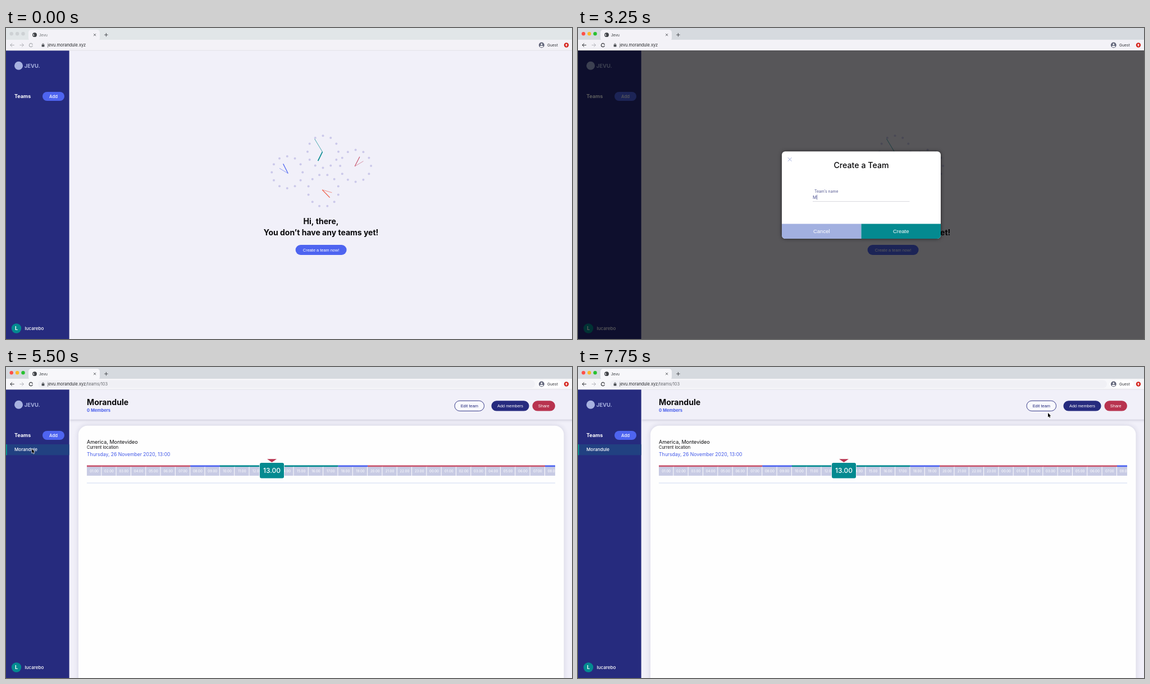
These frames come from a looping animation (1008 by 555 pixels, 8 s). An HTML page with a canvas:

```html
<!DOCTYPE html>
<html lang="en">
<head>
<meta charset="utf-8">
<title>Jevu</title>
<style>
  html, body { margin: 0; width: 100%; height: 100%; overflow: hidden; background: #f1f0f9; }
  canvas { display: block; width: 1008px; height: 555px; }
</style>
</head>
<body>
<canvas id="stage"></canvas>
<script>
const W = 1008, H = 555, TOP = 40, SIDE = 112.6;
const LOOP = 8000, STEP = 250;
const canvas = document.getElementById('stage');
const ratio = Math.max(1, window.devicePixelRatio || 1);
canvas.width = W * ratio;
canvas.height = H * ratio;
const c = canvas.getContext('2d');

const SANS = 'Inter, "Open Sans", sans-serif';
const ARIAL = '"Liberation Sans", Arial, sans-serif';
const NAVY = '#262b7e', BLUE = '#4e64f0', TEAL = '#048a90', PINK = '#c8566f', RED = '#b8334f';
const ORANGE = '#f0503a', PAGE = '#f1f0f9', PALE = '#a8b2e0', INK = '#08080a', GREY = '#4b4e53';
const APP = 'Jevu', TEAM = 'Morandule', USER = 'lucarebo';

function rect(x, y, w, h, fill) {
  c.fillStyle = fill;
  c.fillRect(x, y, w, h);
}

function round(x, y, w, h, r, fill) {
  c.beginPath();
  c.roundRect(x, y, w, h, r);
  c.fillStyle = fill;
  c.fill();
}

function dot(x, y, r, fill) {
  c.beginPath();
  c.arc(x, y, r, 0, Math.PI * 2);
  c.fillStyle = fill;
  c.fill();
}

function stroke(color, width) {
  c.strokeStyle = color;
  c.lineWidth = width;
  c.stroke();
}

function line(color, width, ...pts) {
  c.beginPath();
  for (let i = 0; i < pts.length; i += 2) c.lineTo(pts[i], pts[i + 1]);
  stroke(color, width);
}

function arc(x, y, r, from, to, color, width) {
  c.beginPath();
  c.arc(x, y, r, from, to);
  stroke(color, width);
}

function triangle(x, y, w, h, fill) {
  c.beginPath();
  c.moveTo(x - w / 2, y);
  c.lineTo(x + w / 2, y);
  c.lineTo(x, y + h);
  c.fillStyle = fill;
  c.fill();
}

function cross(x, y, r, color, width) {
  line(color, width, x - r, y - r, x + r, y + r);
  line(color, width, x - r, y + r, x + r, y - r);
}

// dir is -1 for left, 1 for right
function arrow(x, y, dir, color) {
  const tip = x + dir * 3.5;
  line(color, 1, x - dir * 3.5, y, tip, y);
  line(color, 1, tip - dir * 3.3, y - 3.3, tip, y, tip - dir * 3.3, y + 3.3);
}

function text(str, x, y, size, fill, { weight = 400, font = SANS, align = 'left' } = {}) {
  c.font = `${weight} ${size}px ${font}`;
  c.textAlign = align;
  c.fillStyle = fill;
  c.fillText(str, x, y);
}

function label(str, x, y, size, fill, style) {
  text(str, x, y + size * 0.36, size, fill, { font: ARIAL, align: 'center', ...style });
}

function pill(str, x, y, w, h, fill, style, size = 7.4) {
  round(x, y, w, h, h / 2, fill);
  label(str, x + w / 2, y + h / 2, size, '#fff', style);
}

function shadow(color, blur) {
  c.shadowColor = color;
  c.shadowBlur = blur * ratio;
}

function browser(focused, onTeam) {
  const mid = 30.5, tabMid = 12.2;
  const ink = focused ? '#303236' : '#a9abb0';
  const bar = onTeam ? '#f7f7fa' : '#f3f2f7';
  rect(0, 0, W, 22, focused ? '#d6dadf' : '#e1e6e8');
  round(40, 3, 127, 20, 5, bar);
  rect(0, 21, W, TOP - 21, bar);
  rect(0, TOP - 0.4, W, 0.8, '#dbdbe1');

  ['#fe5048', '#fdb827', '#28c131'].forEach((color, i) =>
    dot(9.7 + i * 10.4, 10.2, 3.2, focused ? color : '#cdd1d4'));

  dot(51, tabMid, 3.9, '#3f4246');
  arc(51, tabMid, 2, 2, 4, bar, 1.2);
  text(APP, 59, 14.6, 7, focused ? '#3c4043' : '#74777b', { font: ARIAL });
  cross(158.1, tabMid, 2, GREY, 0.9);
  line(GREY, 1, 175.2, tabMid, 181.6, tabMid);
  line(GREY, 1, 178.4, tabMid - 3.2, 178.4, tabMid + 3.2);

  arrow(11.2, mid, -1, ink);
  arrow(28, mid, 1, '#b3b4ba');
  arc(44.5, mid, 3.1, 0.3, 5.4, ink, 1.1);
  triangle(46.8, 28.4, 2.6, 2.2, ink);

  if (onTeam) {
    round(57, 23.5, 885, 14, 7, '#f0f0f5');
    round(947, 23.5, 42, 14, 7, '#fff');
  }
  round(63.6, 29.5, 4.8, 4, 0.6, GREY);
  arc(66, 29.3, 1.5, Math.PI, 0, GREY, 0.8);
  const host = 'jevu.morandule.xyz';
  text(host, 74, 33.2, 7.4, '#26282b');
  if (onTeam) text('/teams/103', 74 + c.measureText(host).width, 33.2, 7.4, '#63666b');

  dot(953.8, mid, 4.9, '#62667a');
  dot(953.8, 28.9, 1.5, '#fff');
  round(951, 31.7, 5.6, 2.6, 1.3, '#fff');
  text('Guest', 964, 33, 6.8, '#33353a');
  dot(998, mid, 4.2, '#d5261e');
  triangle(998, 30.7, 4.4, -2.7, '#fff');
  rect(997.3, mid, 1.4, 2.3, '#fff');
}

function sidebar(hasTeam) {
  rect(0, TOP, SIDE, H, NAVY);
  dot(22.5, 67.2, 7.5, PALE);
  text(APP.toUpperCase() + '.', 32.8, 70.7, 9.4, PALE, { weight: 700 });
  text('Teams', 15, 125.3, 9, '#fff', { weight: 700 });
  pill('Add', 65, 114, 39, 16, BLUE, { font: SANS, weight: 500 }, 7.7);
  if (hasTeam) {
    rect(0, 138, SIDE, 19.3, '#214181');
    rect(0, 138, 1.8, 19.3, '#05938f');
    text(TEAM, 15, 150.2, 8, '#fff', { weight: 500 });
  }
  dot(18.5, 536, 8.7, TEAL);
  label(USER[0].toUpperCase(), 18.5, 536, 9, '#fff', { font: SANS, weight: 700 });
  text(USER, 33.5, 538.6, 8.1, '#fff', { weight: 500 });
}

function polar(x, y, deg, rx, ry = rx) {
  const a = deg * Math.PI / 180;
  return [x + rx * Math.cos(a), y + ry * Math.sin(a)];
}

function clockFace(x, y, turn) {
  for (let i = 0; i < 12; i++) dot(...polar(x, y, i * 30 + turn, 27.5, 28.6), 2, '#cbc8ea');
}

function hand(x, y, deg, length, width, color) {
  line(color, width, x, y, ...polar(x, y, deg, length));
}

function welcome() {
  clockFace(564.5, 220.8, 0);
  clockFace(500.8, 257.5, 0);
  clockFace(622.6, 246, 0);
  clockFace(565.2, 290, 15);
  hand(563.5, 221, -121, 27, 0.7, TEAL);
  hand(563.5, 221, 116, 18, 1.7, TEAL);
  const small = (x, y, bold, thin, color) => {
    hand(x, y, bold, 19.2, 1.2, color);
    hand(x, y, thin, 17.8, 0.6, color);
  };
  small(502.3, 259.5, -117, -149, BLUE);
  small(621.2, 246.8, -63, -31, PINK);
  small(563.3, 288.8, 46, 16, ORANGE);

  const bold = { weight: 700, align: 'center' };
  text('Hi, there,', 561, 349.8, 14, INK, bold);
  text('You don’t have any teams yet!', 561, 370, 14, INK, bold);
  pill('Create a team now!', 515.6, 387, 91, 18, BLUE);
}

function modal(typed, focused, caret) {
  const x = 363, y = 220.3, w = 283, h = 155.7, r = 6, footer = 349.5;
  rect(0, TOP, W, H, 'rgba(0,0,0,.64)');
  shadow('rgba(0,0,0,.6)', 6);
  round(x, y, w, h, r, '#fff');
  shadow('transparent', 0);
  cross(377.1, 234.5, 3.3, '#9dabdd', 1);
  text('Create a Team', x + w / 2, 249.6, 14.2, INK, { weight: 500, align: 'center' });

  text('Team’s name', 421, focused ? 294.3 : 301.6, focused ? 6.9 : 8, '#565a92');
  const value = TEAM.slice(0, typed);
  text(value, 418, 305, 8.4, '#4c5190', { font: ARIAL });
  if (caret) rect(418.4 + c.measureText(value).width, 297.5, 0.7, 9, '#4c5190');
  rect(418, 309, 172.5, 0.8, '#d0d0d8');

  const half = w / 2, fh = y + h - footer;
  round(x, footer, half, fh, [0, 0, 0, r], '#a2b0e0');
  round(x + half, footer, half, fh, [0, 0, r, 0], TEAL);
  label('Cancel', x + half / 2, footer + fh / 2 - 0.3, 9.5, '#fff');
  label('Create', x + half * 1.5, footer + fh / 2 - 0.3, 9.5, '#fff');
}

function hourColor(h) {
  if (h >= 10 && h < 18) return TEAL;
  return h >= 8 && h < 20 ? BLUE : PINK;
}

function timeline() {
  const x0 = 144, x1 = 978, pitch = 26.32, now = 473.5;
  c.save();
  c.beginPath();
  c.rect(x0, 170, x1 - x0, 30);
  c.clip();
  for (let i = 0; i < 32; i++) {
    const h = (i + 1) % 24, x = x0 + i * pitch;
    rect(x, 178, pitch - 1, 16, '#c8cbe4');
    rect(x, 175.4, pitch + 0.3, 2.8, hourColor(h));
    label(String(h).padStart(2, '0') + '.00', x + pitch / 2, 186, 6.1, '#fff', { font: SANS });
  }
  c.restore();
  triangle(now, 164.2, 17, 5.8, RED);
  round(now - 22.2, 170.3, 44.4, 28.8, 4, '#fff');
  round(now - 21.5, 171, 43, 27.4, 3, TEAL);
  label('13.00', now, 184.4, 12, '#fff', { font: SANS, weight: 500 });
  rect(x0, 206.3, x1 - x0, 1.5, '#dfe6f7');
}

function teamPage() {
  shadow('rgba(40,40,90,.16)', 10);
  round(129, 104.8, 864.5, H, 16, '#fefefe');
  shadow('rgba(40,40,80,.3)', 5);
  rect(SIDE, TOP, W, 53.8, PAGE);
  shadow('transparent', 0);
  text(TEAM, 144, 68, 14.1, INK, { weight: 700 });
  text('0 Members', 144, 79.9, 7.6, '#4a60ec', { weight: 700 });

  round(799, 60.3, 52.6, 18.2, 9.1, '#f8f8fd');
  stroke(NAVY, 0.9);
  label('Edit team', 825.3, 69.4, 7.4, NAVY);
  pill('Add members', 864.4, 60.2, 67.2, 18.4, NAVY);
  pill('Share', 937.4, 60.2, 40.6, 18.4, RED);

  text('America, Montevideo', 144, 136.8, 9, INK);
  text('Current location', 144, 146.4, 7.4, INK);
  text('Thursday, 26 November 2020, 13:00', 144, 159, 8.6, '#4259e8');
  timeline();
}

// pointer path: time, x, y
const PATH = [
  [250, 634, 430], [1500, 553, 396], [2000, 553, 396], [2750, 499, 303],
  [4750, 587, 361], [5000, 577, 316], [5500, 46, 146], [6000, 489, 217.5],
  [6750, 489, 217.5], [7250, 962, 72], [7750, 837, 82]
];

function pointerAt(t) {
  const i = PATH.findIndex(p => p[0] > t);
  if (i < 1) return PATH[PATH.length - 1].slice(1);
  const [t0, x0, y0] = PATH[i - 1], [t1, x1, y1] = PATH[i];
  const k = (t - t0) / (t1 - t0), e = k * k * (3 - 2 * k);
  return [x0 + (x1 - x0) * e, y0 + (y1 - y0) * e];
}

const ARROW = new Path2D('M0 0V7.4L1.7 5.9 2.9 8.6 4.1 8.1 3 5.4 5.2 5.3Z');

function pointer(t) {
  const typing = t >= 3250 && t < 4500;
  if (t < PATH[0][0] || typing) return;
  c.save();
  c.translate(...pointerAt(t));
  c.lineJoin = 'round';
  c.lineWidth = 1.2;
  c.strokeStyle = '#fff';
  c.stroke(ARROW);
  c.fillStyle = '#000';
  c.fill(ARROW);
  c.restore();
}

function typedAt(t) {
  return t < 3250 ? 0 : 1 + 3 * (t - 3250) / STEP;
}

function draw(t) {
  const onTeam = t >= 5500;
  c.setTransform(ratio, 0, 0, ratio, 0, 0);
  rect(0, 0, W, H, PAGE);
  if (onTeam) teamPage();
  else welcome();
  sidebar(t >= 5000);
  browser(t >= 500, onTeam);
  if (t >= 1750 && t < 5000) modal(typedAt(t), t >= 3000, t >= 3000 && t < 4000);
  pointer(t);
}

const start = performance.now();
let last = -1;

function tick(now) {
  const t = Math.floor((Math.max(0, now - start) % LOOP) / STEP) * STEP;
  if (t !== last) draw(last = t);
  requestAnimationFrame(tick);
}

draw(0);
requestAnimationFrame(tick);
</script>
</body>
</html>
```
